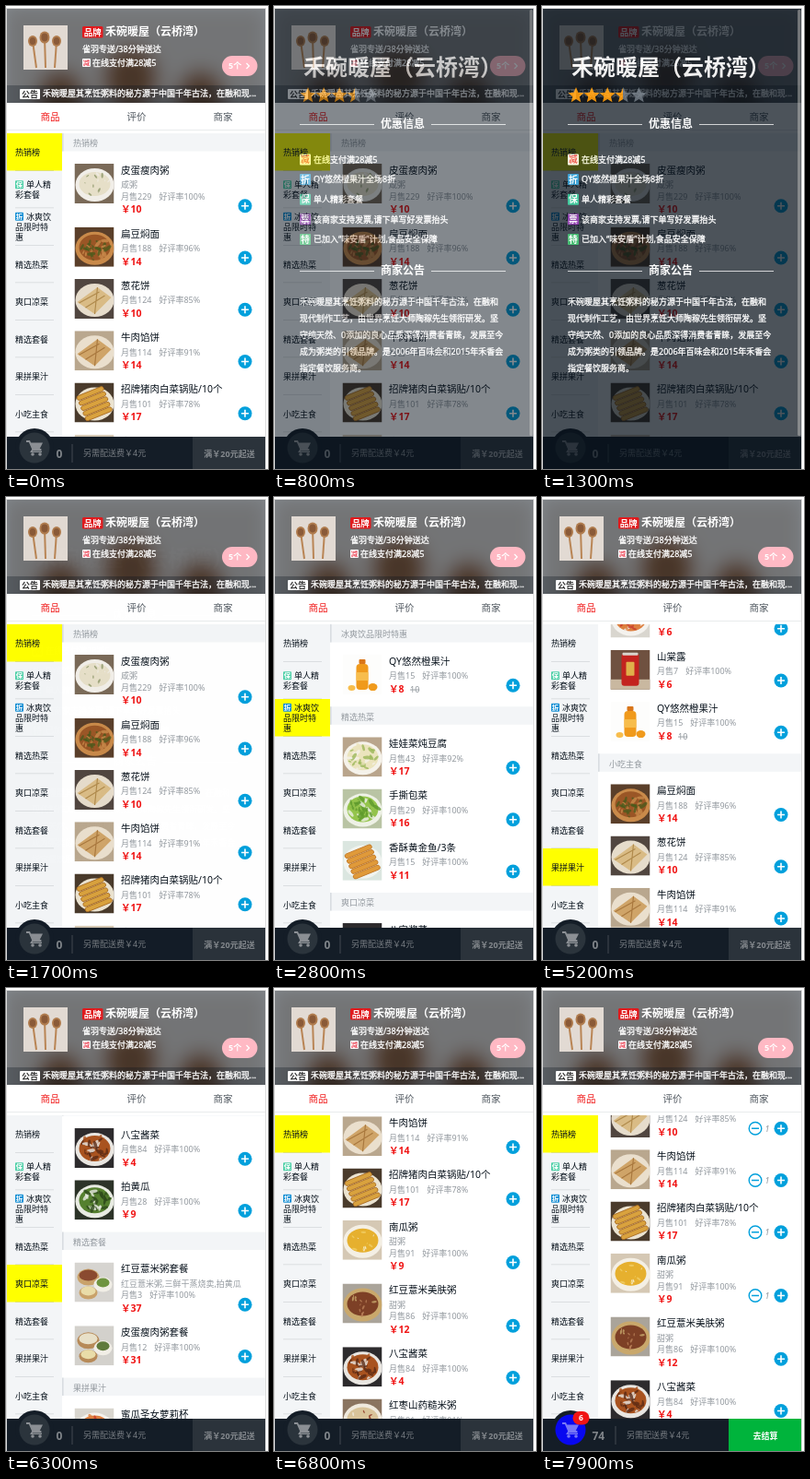
Recreate the animation shown at these times as an HTML page. Size 285 by 502 pixels, loop 8 s.

```html
<!DOCTYPE html>
<html lang="zh-CN">
<head>
<meta charset="utf-8">
<style>
html, body { margin: 0; width: 100%; height: 100%; overflow: hidden; background: #fff; }
#stage { display: block; width: 285px; height: 502px; font-family: "Noto Sans", "Noto Sans CJK SC", "Noto Sans CJK", sans-serif; }
.b { font-weight: 700; }
.m { stroke: #fff; stroke-width: .3px; }
.mid { text-anchor: middle; }
</style>
</head>
<body>
<svg id="stage" viewBox="0 0 285 502" xmlns="http://www.w3.org/2000/svg"></svg>
<script>
const LOOP = 8000, TICK = 100;
const INK = '#07111b', GREY = '#93999f', RED = '#f01414', BLUE = '#00a0dc', DIM = 'rgba(255,255,255,.42)';
const TOP = 138, BAR = 467, HEAD = 19.5, GAP = 13.5, ROW = 56.25, MENU = 40.5;
const SHOP = '禾碗暖屋（云桥湾）', JUICE = 'QY悠然橙果汁';

// name, note lines, sold, rating, price, old price, [background, plate, food, accent, shape]
const dishes = {
  egg: ['皮蛋瘦肉粥', ['咸粥'], 229, 100, 10, 0, ['#7a6a58', '#f1eee8', '#e6dfc8', '#8c9668']],
  noodle: ['扁豆焖面', [], 188, 96, 14, 0, ['#5a3f2a', '#c98a4a', '#9a5626', '#4d5a1c', 'heap']],
  onion: ['葱花饼', [], 124, 85, 10, 0, ['#514640', '#e6dccb', '#d9bb85', '#b08a4c', 'pie']],
  beef: ['牛肉馅饼', [], 114, 91, 14, 0, ['#b9a78e', '#eadfcd', '#cfa468', '#a9783e', 'pie']],
  fried: ['招牌猪肉白菜锅贴/10个', [], 101, 78, 17, 0, ['#4a3b2c', '#ebe3d0', '#d9a23e', '#a86a22', 'sticks']],
  pumpkin: ['南瓜粥', ['甜粥'], 91, 100, 9, 0, ['#d5c8b4', '#f4efe4', '#e6b02e', '#f2cf66']],
  bean: ['红豆薏米美肤粥', ['甜粥'], 86, 100, 12, 0, ['#aaa49a', '#c9a86c', '#7d4026', '#b98058']],
  pickle: ['八宝酱菜', [], 84, 100, 4, 0, ['#2d2b2d', '#e9e6e1', '#a9531f', '#5a2a14', 'heap']],
  yam: ['红枣山药糙米粥', [], 81, 91, 10, 0, ['#8a7460', '#efe9dd', '#d8c39a', '#8c3422']],
  cake: ['糊塌子', [], 80, 93, 10, 0, ['#54483a', '#e8dfca', '#c9b050', '#7c8c3a', 'pie']],
  set1: ['红枣山药粥套餐', ['红枣山药糙米粥,素材包,爽口莴', '笋丝,四川泡菜或八宝酱菜'], 17, 100, 29, 36, ['#d3d1cc', '#f3efe8', '#d8c39a', '#8c3422', 'bowls']],
  juice: [JUICE, [], 15, 100, 8, 10, ['#fdfdfc', '#e8e4dc', '#f09a1c', '#f7bd4c', 'bottle']],
  tofu: ['娃娃菜炖豆腐', [], 43, 92, 17, 0, ['#b9a58c', '#f5f2ea', '#ebe4bd', '#9db85a', 'heap']],
  cabbage: ['手撕包菜', [], 29, 100, 16, 0, ['#b9c4a4', '#eef1e6', '#94c44c', '#5e9a2c', 'heap']],
  fish: ['香酥黄金鱼/3条', [], 15, 100, 11, 0, ['#dbe6e0', '#f1f4f0', '#e09a3a', '#bf7422', 'sticks']],
  cucumber: ['拍黄瓜', [], 28, 100, 9, 0, ['#2c3328', '#e8ebe2', '#55802f', '#2f4a1c', 'heap']],
  set2: ['红豆薏米粥套餐', ['红豆薏米粥,三鲜干蒸烧卖,拍黄瓜'], 3, 100, 37, 0, ['#d6d4d0', '#c9a26a', '#8a4a30', '#6f9440', 'bowls']],
  set3: ['皮蛋瘦肉粥套餐', [], 12, 100, 31, 0, ['#d3d1cc', '#b78a58', '#e8e0c8', '#5f7a3c', 'bowls']],
  melon: ['蜜瓜圣女萝莉杯', [], 1, 100, 6, 0, ['#d9d6cf', '#f4f2ee', '#dd8040', '#c83a2c', 'heap']],
  can: ['山棠露', [], 7, 100, 6, 0, ['#6f5140', '#c9b8a0', '#c3231f', '#e0b04a', 'can']]
};
const groups = [
  ['热销榜', 'egg noodle onion beef fried pumpkin bean pickle yam cake'],
  ['单人精彩套餐', 'set1'],
  ['冰爽饮品限时特惠', 'juice'],
  ['精选热菜', 'tofu cabbage fish'],
  ['爽口凉菜', 'pickle cucumber'],
  ['精选套餐', 'set2 set3'],
  ['果拼果汁', 'melon can juice'],
  ['小吃主食', 'noodle onion beef fried cake']
];

const rect = (x, y, w, h, fill, more = '') => `<rect x="${x}" y="${y}" width="${w}" height="${h}" fill="${fill}" ${more}/>`;
const oval = (x, y, rx, ry, fill, more = '') => `<ellipse cx="${x}" cy="${y}" rx="${rx}" ry="${ry}" fill="${fill}" ${more}/>`;
const line = (d, stroke, w = 1) => `<path d="${d}" fill="none" stroke="${stroke}" stroke-width="${w}"/>`;
// y is the vertical middle of the glyphs
const text = (x, y, s, size = 9, fill = GREY, cls = '', more = '') =>
  `<text x="${x}" y="${y + size * .37}" font-size="${size}" fill="${fill}" class="${cls}" ${more}>${s}</text>`;
const tag = (x, y, size, ch, bg, fg = '#fff') =>
  rect(x, y, size, size, bg, 'rx="1"') + text(x + size / 2, y + size / 2, ch, size * .82, fg, 'b mid');

function random(seed) {
  return () => (seed = (seed * 16807) % 2147483647) / 2147483647;
}

function picture([bg, plate, food, accent, shape], seed) {
  const rnd = random(seed * 977 + 31);
  let s = rect(0, 0, 43, 43, bg);
  if (shape === 'bottle') {
    s += rect(18, 5, 7, 5, '#d9761a', 'rx="1"') + rect(15, 10, 13, 28, food, 'rx="4"') + rect(15, 19, 13, 9, accent);
    s += oval(33, 35, 5, 4, food) + oval(10, 36, 4, 3, accent);
  } else if (shape === 'can') {
    s += rect(0, 32, 43, 11, plate) + rect(12, 4, 19, 35, food, 'rx="3"') + rect(13, 3, 17, 3, '#d8d4cc', 'rx="1"');
    s += rect(17, 13, 9, 15, accent, 'rx="1"');
  } else if (shape === 'bowls') {
    s += oval(15, 16, 12, 9, plate) + oval(15, 14, 10, 6, food) + oval(31, 24, 10, 8, '#f1eee6') + oval(31, 22, 7, 5, accent);
    s += oval(15, 33, 10, 7, plate) + oval(15, 31, 8, 5, '#e9dca8');
  } else {
    s += oval(22, 23, 21, 18, plate);
    if (shape === 'pie') {
      s += `<path d="M3 25L25 9L40 20L22 38Z" fill="${food}"/>` + line('M5 26L27 14M12 31L33 18M22 38L25 9', accent, 1.2);
    } else if (shape === 'sticks') {
      for (let i = 0; i < 5; i++)
        s += `<g transform="rotate(-22 22 22)">${rect(6, 8 + i * 6, 31, 5, food, `rx="2.5" stroke="${accent}" stroke-width=".8"`)}</g>`;
    } else {
      const heap = shape === 'heap';
      s += oval(22, 22, 17, heap ? 14 : 13, food);
      for (let i = 0; i < (heap ? 34 : 14); i++) {
        const a = rnd() * 6.28, r = Math.sqrt(rnd());
        const x = 22 + 16 * r * Math.cos(a), y = 22 + 12 * r * Math.sin(a);
        const size = heap ? 2 + rnd() * 3 : 1 + rnd() * 2;
        s += oval(x, y, size, size * .4, [plate, accent, food, accent][i % 4], `opacity=".8" transform="rotate(${rnd() * 180} ${x} ${y})"`);
      }
    }
  }
  return s;
}

const rowHeight = d => ROW + (d[1].length ? 3.2 + d[1].length * 9.3 : 0);

function dishRow(d, y, seed, countable) {
  const [name, notes, sold, rate, price, old, pic] = d;
  const h = rowHeight(d), extra = h - ROW, by = y + h - 23;
  let s = `<svg x="74.5" y="${y}" width="43" height="43">${picture(pic, seed)}</svg>`;
  s += text(125, y + 7, name, 10.5, INK);
  notes.forEach((n, i) => s += text(125, y + 23 + i * 9.3, n));
  s += text(125, y + 23 + extra, `月售${sold}<tspan dx="8">好评率${rate}%</tspan>`);
  s += text(125, y + 37 + extra, '￥' + price, 10.5, RED, 'b');
  if (old) s += text(148, y + 38 + extra, old, 9, GREY, '', 'text-decoration="line-through"');
  s += oval(260, by, 7.5, 7.5, BLUE) + line(`M256 ${by}h8M260 ${by - 4}v8`, '#fff', 1.6);
  if (countable) {
    s += `<g class="qty" visibility="hidden">${oval(232, by, 6.8, 6.8, '#fff', `stroke="${BLUE}" stroke-width="1.4"`)}` +
      line(`M228 ${by}h8`, BLUE, 1.5) + text(245, by, '1', 9, GREY, 'mid', 'font-style="italic"') + '</g>';
  }
  return s;
}

const tops = [];
function foodList() {
  let y = 0, s = '';
  groups.forEach(([title, keys], g) => {
    tops.push(y);
    s += rect(61, y, 221, HEAD, '#f3f5f7') + rect(61, y, 1.6, HEAD, '#d9dde1') + text(73, y + 11, title);
    y += HEAD + GAP;
    keys.split(' ').forEach((k, i) => {
      s += dishRow(dishes[k], y, k.length * 7 + k.charCodeAt(0), g === 0 && i < 6);
      y += rowHeight(dishes[k]);
    });
  });
  return s;
}

function menu() {
  let s = rect(1, TOP, 60, BAR - TOP, '#f3f5f7') + rect(1, TOP, 60, MENU, '#ff0', 'id="mark"');
  groups.forEach(([title], i) => {
    const y = TOP + MENU * (i + .5) + .5;
    s += rect(10, TOP + MENU * (i + 1) - .5, 42, .7, 'rgba(7,17,27,.14)');
    if (i === 1) {
      s += tag(10, y - 10, 9, '保', '#4fd0a8') + text(22, y - 5.5, '单人精', 9, INK) + text(10, y + 5.5, '彩套餐', 9, INK);
    } else if (i === 2) {
      s += tag(10, y - 16, 9, '折', '#1c93d6') + text(22, y - 11, '冰爽饮', 9, INK) +
        text(10, y, '品限时特', 9, INK) + text(10, y + 10.5, '惠', 9, INK);
    } else s += text(10, y, title, 9, INK);
  });
  return s;
}

// wooden spoons on a 48 by 48 square
const spoons = () => rect(0, 0, 48, 48, '#e2dad3') + [[10, 17, 5], [23, 13, 5.5], [36, 17, 5]].map(([x, y, r], i) =>
  line(`M${x} ${y}L${x + 4 - i * 3} 46`, '#b98555', 2) + oval(x, y, r, r * 1.2, '#b07c4e') + oval(x, y, r * .65, r * .8, '#8a5a38')).join('');

function header() {
  return `<g clip-path="url(#top)"><g transform="translate(1 3) scale(5.854)" filter="url(#soft)">${spoons()}</g></g>` +
    rect(1, 3, 281, 102, 'rgba(7,17,27,.5)') + rect(1, 86, 281, 19, 'rgba(7,17,27,.3)') +
    `<g transform="translate(19 21)">${spoons()}</g>` +
    rect(83, 22, 22.5, 12.5, '#e0191c', 'rx="1.5"') + text(94.2, 28, '品牌', 9.5, '#fff', 'b mid') +
    text(108, 28, SHOP, 12, '#fff', 'b') +
    text(83, 47, '雀羽专送/38分钟送达', 9, '#fff', 'm') +
    tag(83, 57, 9, '减', '#fff', '#ee4f5f') + text(94, 62, '在线支付满28减5', 9, '#fff', 'm') +
    rect(235, 54, 38.5, 22, '#ffb9c4', 'rx="11"') + text(242, 65, '5个', 9, '#fff', 'b') + line('M261.5 62l3 3l-3 3', '#fff', 1.3) +
    rect(15, 90, 22, 11, '#fff', 'rx="1"') + text(26, 95.5, '公告', 9, '#333', 'b mid') +
    text(40, 95, '禾碗暖屋其烹饪粥料的秘方源于中国千年古法，在融和现...', 9, '#fff', 'm') +
    text(48, 120, '商品', 10.5, RED, 'mid') + text(142, 120, '评价', 10.5, '#4d555d', 'mid') + text(236, 120, '商家', 10.5, '#4d555d', 'mid') +
    rect(1, 134, 281, .8, '#e4e6e8');
}

function cart() {
  const price = (id, bar, label) => `<g id="${id}">` + text(54.5, 485.5, '0', 12, '#80858a', 'b sum') +
    rect(bar, 475, 1, 20, 'rgba(255,255,255,.2)') + text(bar + 12.5, 485, '另需配送费￥4元', 9, DIM) + label + '</g>';
  const action = fill => rect(203, BAR, 79, 502 - BAR, fill);
  return rect(1, BAR, 281, 502 - BAR, '#141d27') + oval(31, 479, 21, 21, '#141d27') + oval(31, 479, 16.5, 16.5, '#2b343c', 'id="disc"') +
    `<g opacity=".45">${line('M22 472h3.4l4 9h9', '#fff', 1.8)}<path d="M26 473.5h14l-3.5 7h-7.5z" fill="#fff"/>${oval(29, 486, 1.8, 1.8, '#fff')}${oval(37, 486, 1.8, 1.8, '#fff')}${line('M29.5 480l-2 3.2h11.5', '#fff', 1.6)}</g>` +
    price('empty', 71.5, action('#2b333b') + text(243, 485.5, '满￥20元起送', 9, DIM, 'b mid')) +
    price('full', 79.5, action('#00b43c') + text(243, 485.5, '去结算', 9, '#fff', 'b mid') +
      rect(33.5, 459, 18, 14.5, RED, 'rx="7.2"') + text(42.5, 466.2, '0', 8.5, '#fff', 'b mid', 'id="badge"'));
}

function star(cx, cy, fill) {
  const pts = [...Array(10).keys()].map(i => {
    const r = i % 2 ? 4 : 9, a = i * Math.PI / 5;
    return [cx + r * Math.sin(a), cy - r * Math.cos(a)].map(v => v.toFixed(1));
  });
  return `<polygon points="${pts.join(' ')}" fill="${fill}"/>`;
}

function details() {
  const title = (y, s) => text(140, y, s, 12, '#fff', 'b mid') + rect(28, y, 81, 1, 'rgba(255,255,255,.75)') + rect(171, y, 81, 1, 'rgba(255,255,255,.75)');
  const offers = [
    ['减', '#fff', '在线支付满28减5', '#ee4f5f'],
    ['折', '#2b9bd2', JUICE + '全场8折'],
    ['保', '#2fc594', '单人精彩套餐'],
    ['票', '#9038b0', '该商家支持发票,请下单写好发票抬头'],
    ['特', '#35b765', '已加入“味安盾”计划,食品安全保障']
  ];
  const notice = [
    '禾碗暖屋其烹饪粥料的秘方源于中国千年古法，在融和',
    '现代制作工艺，由世界烹饪大师陶稼先生领衔研发。坚',
    '守纯天然、0添加的良心品质深得消费者青睐，发展至今',
    '成为粥类的引领品牌。是2006年百味会和2015年禾香会',
    '指定餐饮服务商。'
  ];
  return '<g id="details">' + rect(1, 3, 281, 499, 'rgba(7,17,27,.8)') +
    rect(278, 4, 3.5, 462, 'rgba(150,150,150,.7)', 'rx="1.5"') +
    text(140, 66, SHOP, 24, '#fff', 'b mid') +
    [0, 1, 2, 3, 4].map(i => star(37 + i * 17.1, 97, i < 3 ? '#ff9c0a' : i === 3 ? 'url(#half)' : '#68727c')).join('') +
    title(128, '优惠信息') +
    offers.map(([ch, bg, s, fg], i) => tag(28, 160.5 + i * 21.6, 12, ch, bg, fg) + text(43, 166.5 + i * 21.6, s, 9, '#fff', 'm')).join('') +
    title(287, '商家公告') +
    notice.map((s, i) => text(28, 321 + i * 17.8, s, 9, '#fff', 'm')).join('') + '</g>';
}

const stage = document.getElementById('stage');
stage.innerHTML = `<defs>
  <linearGradient id="half"><stop offset=".5" stop-color="#ff9c0a"/><stop offset=".5" stop-color="#68727c"/></linearGradient>
  <filter id="soft"><feGaussianBlur stdDeviation="1.6"/></filter>
  <clipPath id="top"><rect x="1" y="3" width="281" height="102"/></clipPath>
  <clipPath id="view"><rect x="61" y="${TOP}" width="221" height="${BAR - TOP}"/></clipPath>
  <clipPath id="frame"><rect x="1" y="3" width="281" height="499"/></clipPath>
</defs>` + rect(0, 0, 285, 502, '#fff') + rect(.5, 2.5, 282, 502, '#fff', 'stroke="#dcdcdc"') +
  `<g clip-path="url(#frame)"><g clip-path="url(#view)"><g id="list">${foodList()}</g></g>` + menu() +
  rect(1, 105, 281, 33, '#fff') + header() + cart() + details() + '</g>';

const $ = id => document.getElementById(id);
const list = $('list'), mark = $('mark'), disc = $('disc'), badge = $('badge'), empty = $('empty'), full = $('full');
const quantities = [...stage.querySelectorAll('.qty')], total = full.querySelector('.sum');

const fade = $('details').animate([
  { opacity: 0, offset: 0 },
  { opacity: 0, offset: 620 / LOOP, easing: 'ease' },
  { opacity: 1, offset: 1120 / LOOP },
  { opacity: 1, offset: 1250 / LOOP, easing: 'ease' },
  { opacity: 0, offset: 1750 / LOOP },
  { opacity: 0, offset: 1 }
], { duration: LOOP, fill: 'both' });
fade.pause();

const glide = (t, start, span, from, to, ease) => from + (to - from) * ease(Math.min(1, Math.max(0, (t - start) / span)));
const outQuad = p => 1 - (1 - p) ** 2;
const outSine = p => Math.sin(p * Math.PI / 2);

function scrollAt(t) {
  const hot = tops[3], far = hot + 674;
  if (t >= 7100) return 177;
  if (t >= 6100) return glide(t, 6090, 1080, far, 0, outSine);
  if (t >= 4600) return glide(t, 4600, 1000, hot + 6, far, outQuad);
  if (t >= 3300) return glide(t, 3230, 370, tops[2], hot, outQuad);
  return glide(t, 2430, 370, 0, tops[2], outQuad);
}

function draw(t) {
  const s = Math.round(scrollAt(t));
  list.setAttribute('transform', `translate(0 ${TOP - s})`);
  const active = tops.filter(y => Math.round(y) <= s).length - 1;
  mark.setAttribute('y', TOP + active * MENU);

  const count = t >= 7900 ? 6 : t >= 7100 ? 5 : 0;
  quantities.forEach((q, i) => q.setAttribute('visibility', i < count ? 'visible' : 'hidden'));
  empty.style.display = count ? 'none' : '';
  full.style.display = count ? '' : 'none';
  disc.setAttribute('fill', count ? '#0808f0' : '#2b343c');
  badge.textContent = count;
  total.textContent = groups[0][1].split(' ').slice(0, count).reduce((sum, k) => sum + dishes[k][4], 0);
  fade.currentTime = t;
}

// the screen refreshes ten times a second
const begin = performance.now();
function run() {
  const t = (performance.now() - begin) % LOOP;
  draw(Math.floor(t / TICK) * TICK);
  requestAnimationFrame(run);
}
run();
</script>
</body>
</html>
```
